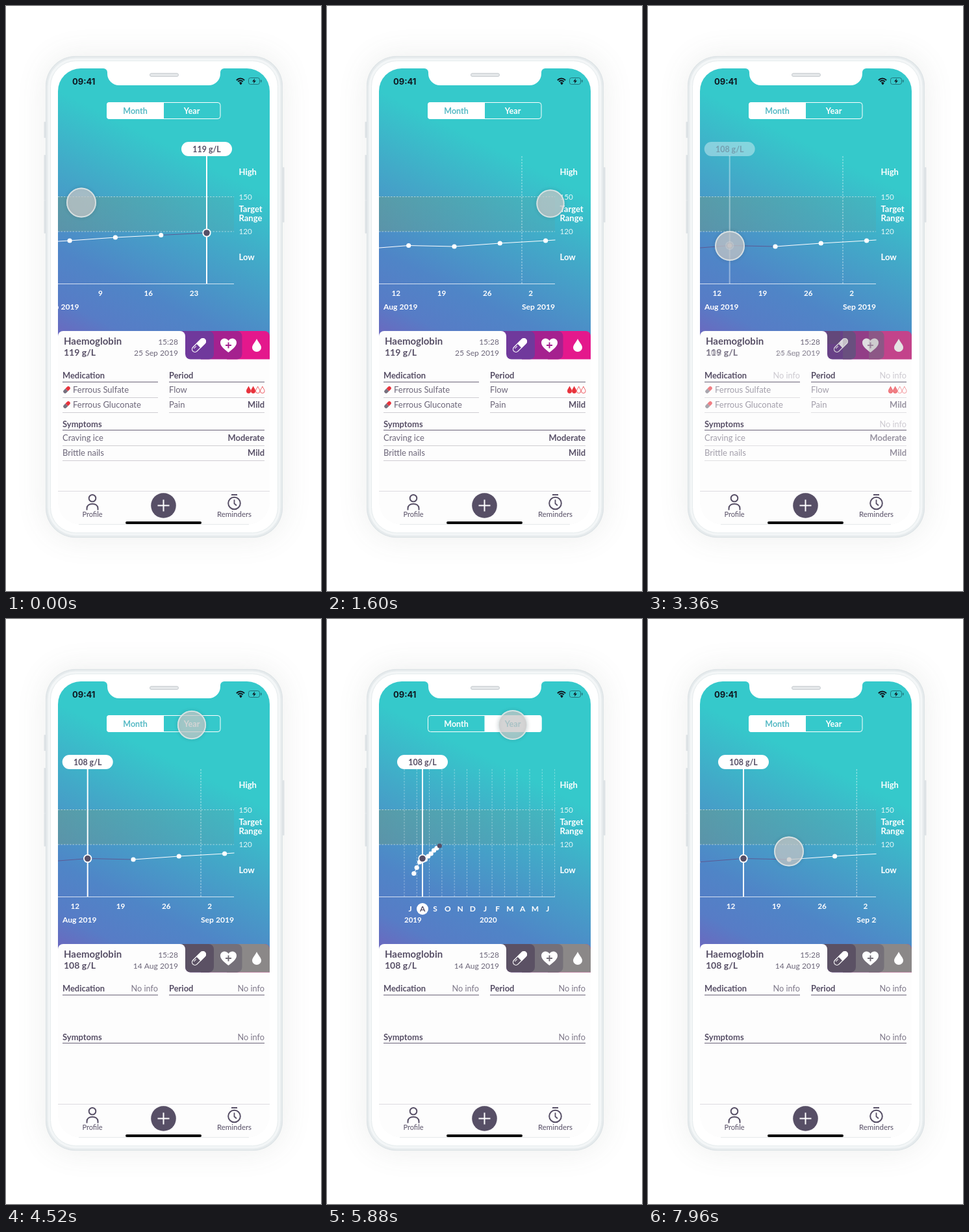
Recreate the animation shown at these times as an HTML page with a canvas. Size 485 by 900 pixels, loop 8000 ms.

```html
<!DOCTYPE html>
<html lang="en">
<head>
<meta charset="utf-8">
<title>Blood tracker</title>
<style>
html, body { margin: 0; width: 100%; height: 100%; overflow: hidden; background: #fff; }
canvas { display: block; width: 485px; height: 900px; }
</style>
</head>
<body>
<canvas id="stage"></canvas>
<script>
const W = 485, H = 900, LOOP = 8000;
const canvas = document.getElementById('stage');
const dpr = window.devicePixelRatio || 1;
canvas.width = W * dpr;
canvas.height = H * dpr;
const c = canvas.getContext('2d');

const INK = '#574f66', SOFT = '#6c6679', TEAL = '#55b9c4', RED = '#e8323c';
const DOT_Y = [391.5, 382.5, 374, 368.5, 370, 365, 361, 356, 352.5, 349];
const MONTH_GAP = 70.3, YEAR_GAP = 4.39, FIRST_ANCHOR = -112.8, YEAR_ANCHOR = 147;
const SCROLL = { at: 523, dur: 1000, dist: 238.5 };
const PICK = 3300, TO_YEAR = 4800, TO_MONTH = 6600, MORPH = 750;

// Touch point: time, x, y, radius
const TOUCH = [
  [0, 116, 302.5, 23], [380, 93, 302.5, 23], [523, 93, 302.5, 21], [1523, 344, 304, 21],
  [1700, 344, 304, 23], [2400, 344, 304, 23], [3050, 126, 369, 23], [3200, 126, 369, 21],
  [3350, 126, 369, 23], [3600, 126, 369, 23], [4250, 286, 163, 23], [4450, 286, 163, 23],
  [4600, 286, 163, 21], [4800, 286, 163, 23], [6000, 286, 163, 23], [6350, 203, 163, 23],
  [6500, 203, 163, 21], [6650, 203, 163, 23], [7250, 203, 163, 23], [7900, 217, 357.5, 23],
  [LOOP, 217, 357.5, 23]
];

const clamp = v => Math.max(0, Math.min(1, v));
const mix = (a, b, p) => a + (b - a) * p;
const ramp = (t, at, dur) => clamp((t - at) / dur);
const cubic = p => p < .5 ? 4 * p ** 3 : 1 - 4 * (1 - p) ** 3;
const ease = (t, at, dur) => cubic(ramp(t, at, dur));

function touchAt(t) {
  const i = Math.max(1, TOUCH.findIndex(k => k[0] > t));
  const a = TOUCH[i - 1], b = TOUCH[i];
  const p = ease(t, a[0], b[0] - a[0]);
  return [1, 2, 3].map(n => mix(a[n], b[n], p));
}

function text(s, x, y, size, bold, color = INK, align = 'left', family = 'Lato, "Open Sans", sans-serif') {
  c.font = `${bold ? 700 : 400} ${size}px ${family}`;
  c.fillStyle = color;
  c.textAlign = align;
  c.fillText(s, x, y);
}

function box(x, y, w, h, r, fill, stroke, lw = 1) {
  c.beginPath();
  c.roundRect(x, y, w, h, r);
  if (fill) { c.fillStyle = fill; c.fill(); }
  if (stroke) { c.strokeStyle = stroke; c.lineWidth = lw; c.stroke(); }
}

function disc(x, y, r, fill, stroke, lw = 1) {
  c.beginPath();
  c.arc(x, y, r, 0, Math.PI * 2);
  if (fill) { c.fillStyle = fill; c.fill(); }
  if (stroke) { c.strokeStyle = stroke; c.lineWidth = lw; c.stroke(); }
}

function line(points, color, lw = 1, dash = []) {
  c.beginPath();
  points.forEach(([x, y], i) => i ? c.lineTo(x, y) : c.moveTo(x, y));
  c.setLineDash(dash);
  c.strokeStyle = color;
  c.lineWidth = lw;
  c.stroke();
  c.setLineDash([]);
}

function scoped(fn, alpha = 1) {
  if (alpha <= 0) return;
  c.save();
  c.globalAlpha *= alpha;
  fn();
  c.restore();
}

function shape(d, x, y, fill, stroke, lw = 1) {
  scoped(() => {
    c.translate(x, y);
    const p = new Path2D(d);
    if (fill) { c.fillStyle = fill; c.fill(p); }
    if (stroke) { c.strokeStyle = stroke; c.lineWidth = lw; c.stroke(p); }
  });
}

function drawBody() {
  scoped(() => {
    c.shadowColor = 'rgba(90,100,90,.11)';
    c.shadowBlur = 48 * dpr;
    box(61, 77, 365, 741, 46, '#e2e7e9');
  });
  [[58.5, 178, 25], [58.5, 229, 70], [58.5, 299, 51], [426, 248, 85]]
    .forEach(([x, y, h]) => box(x, y, 2.5, h, 1, '#dde2e5'));
  box(61.5, 77.5, 364, 740, 46, '#e6ebed', '#dde3e6');
  box(64.5, 80.5, 358, 734, 43, '#f3f6f7');
  box(68.5, 84.5, 350, 726, 39, '#fff', '#e6eced');
}

function drawBackdrop() {
  c.fillStyle = '#fdfdfd';
  c.fillRect(80, 96, 326, 702);
  const g = c.createLinearGradient(-.447 * 80, .894 * 80, -.447 * 415, .894 * 415);
  [[0, '#35c9cb'], [.3, '#42a9c8'], [.66, '#4f85c7'], [.86, '#577cc6'], [1, '#6a69bf']]
    .forEach(s => g.addColorStop(...s));
  c.fillStyle = g;
  c.fillRect(80, 96, 326, 418);
  const band = c.createLinearGradient(80, 300, 340, 345);
  band.addColorStop(0, 'rgba(110,155,130,.45)');
  band.addColorStop(1, 'rgba(85,165,170,.3)');
  c.fillStyle = band;
  c.fillRect(80, 293, 271, 54);
}

function drawNotch() {
  c.beginPath();
  c.moveTo(149, 94);
  c.lineTo(149, 96);
  c.arcTo(156, 96, 156, 103, 6);
  c.arcTo(156, 122, 175, 122, 18);
  c.arcTo(330, 122, 330, 103, 18);
  c.arcTo(330, 96, 337, 96, 6);
  c.lineTo(337, 94);
  c.fillStyle = '#fff';
  c.fill();
}

function drawStatus() {
  drawNotch();
  text('09:41', 102, 120.5, 13, true, '#101820', 'left', 'Inter, sans-serif');
  [2, 5.2, 8.4].forEach((r, i) => {
    c.beginPath();
    c.arc(361, 120, r, -Math.PI * .76, -Math.PI * .24);
    if (!i) { c.lineTo(361, 120.8); c.fillStyle = '#101820'; c.fill(); }
    c.strokeStyle = '#101820';
    c.lineWidth = 2;
    c.stroke();
  });
  box(373.5, 110.5, 17, 10, 3, null, 'rgba(20,50,60,.55)');
  box(392, 113.5, 1.5, 4, .7, 'rgba(20,50,60,.55)');
  shape('M1 -4L-3 .7H-.3L-1 4L3 -.7H.3Z', 382, 115.5, '#101820');
}

function drawToggle(year) {
  box(155.5, 148.5, 174.5, 25, 4, null, '#fff');
  box(year ? 242.5 : 155, 148, 88, 26, year ? [0, 4, 4, 0] : [4, 0, 0, 4], '#fff');
  text('Month', 199, 165.5, 12.5, true, year ? '#fff' : TEAL, 'center');
  text('Year', 286, 165.5, 12.7, true, year ? TEAL : '#fff', 'center');
}

function drawScale() {
  const dim = 'rgba(255,255,255,.5)';
  line([[80, 293.5], [351, 293.5]], dim, 1, [2.5, 2]);
  line([[80, 347], [351, 347]], dim, 1, [2.5, 2]);
  line([[80, 427.5], [351, 427.5]], 'rgba(255,255,255,.75)');
  [['High', 259.5], ['Target', 317.3], ['Range', 331.3], ['Low', 390.7]]
    .forEach(([s, y]) => text(s, 358.5, y, 13, true, '#fff'));
  text('150', 358.5, 297.5, 11.7, false, '#e4f6f7');
  text('120', 358.5, 351, 11.7, false, '#e4f6f7');
}

function drawMonthAxis(off, first) {
  [23, 16, 9, 2, 26, 19, 12, 5].forEach((day, i) =>
    text(day, 282.7 - 70.3 * i + off, 445.5, 11.7, true, '#fff'));
  text('Sep 2019', 61.5 + off, 466.5, 12.1, true, '#fff');
  if (first) text('Aug 2019', -151.5 + off, 466.5, 12.1, true, '#fff');
}

function drawYearAxis() {
  disc(147, 446, 9, '#fff');
  [...'JASONDJFMAMJ'].forEach((s, i) =>
    text(s, 128 + 19.25 * i, 450.3, 12, true, i === 1 ? INK : '#fff', 'center'));
  text('2019', 119, 466.5, 11.5, true, '#fff');
  text('2020', 235, 466.5, 11.5, true, '#fff');
}

function drawMarker(x, y, label) {
  line([[x, 230], [x, 427]], '#fff', 2);
  box(x - 39, 209, 78, 22, 11, '#fff');
  text(label, x, 224.5, 12.4, true, INK, 'center');
  disc(x, y, 6.6, '#fff');
  disc(x, y, 4.8, INK);
}

function drawChart(t) {
  const off = SCROLL.dist * ease(t, SCROLL.at, SCROLL.dur);
  const shrink = ease(t, TO_YEAR, MORPH) - ease(t, TO_MONTH, MORPH);
  const gap = mix(MONTH_GAP, YEAR_GAP, shrink);
  const anchor = mix(FIRST_ANCHOR + off, YEAR_ANCHOR, ease(t, TO_YEAR, MORPH));
  const inYear = t >= TO_YEAR && t < TO_MONTH;
  const late = t >= TO_MONTH;
  const axisOff = late ? YEAR_ANCHOR - FIRST_ANCHOR : off;
  const picked = t >= PICK, shown = ramp(t, PICK, 160);
  const xs = DOT_Y.map((_, i) => anchor + (i - 3) * gap);
  const sel = picked ? 3 : 9;
  const gridLine = x => line([[x, 231], [x, 427]], 'rgba(255,255,255,.62)', 1, [2.5, 2]);

  drawScale();
  c.save();
  c.beginPath();
  c.rect(80, 180, 271.5, 315);
  c.clip();

  scoped(() => {
    const spread = 1 + .015 * ease(t, TO_MONTH, 200);
    for (let i = 0; i <= 12; i++) gridLine(YEAR_ANCHOR + (19.3 * i - 28) * spread);
  }, ramp(t, 5350, 850) * (1 - ramp(t, 6780, 420)));

  scoped(() => gridLine(61.5 + axisOff),
    late ? ramp(t, 7100, 250) : 1 - ramp(t, TO_YEAR, 200));

  if (inYear) drawYearAxis();
  else drawMonthAxis(axisOff, !late);

  for (let i = 0; i < 9; i++) {
    const dark = i === sel || i + 1 === sel;
    line([[xs[i], DOT_Y[i]], [xs[i + 1], DOT_Y[i + 1]]], dark ? '#5c5a94' : '#fff', 1);
  }
  xs.forEach((x, i) => disc(x, DOT_Y[i], 3.6, picked && i === 9 ? INK : '#fff'));
  if (picked) scoped(() => drawMarker(xs[3], DOT_Y[3], '108 g/L'), shown);
  else drawMarker(xs[9], DOT_Y[9], '119 g/L');
  c.restore();
}

const DROP = 'M0 -10C2 -5 7 -1 7 3.5A7 6.5 0 0 1 -7 3.5C-7 -1 -2 -5 0 -10Z';
const HEART = 'M0 11C-5 7 -12.5 2 -12.5 -4C-12.5 -8 -9.5 -10.5 -6 -10.5C-3.5 -10.5 -1.2 -9 0 -7C1.2 -9 3.5 -10.5 6 -10.5C9.5 -10.5 12.5 -8 12.5 -4C12.5 2 5 7 0 11Z';

function drawTabs(colors) {
  box(340, 500, 66, 43.5, [0, 8, 0, 0], colors[2]);
  box(300, 500, 63.5, 43.5, [0, 8, 8, 0], colors[1]);
  box(266, 500, 30, 20, 0, colors[0]);
  box(276, 500, 44, 43.5, [0, 8, 8, 8], colors[0]);
  scoped(() => {
    c.translate(297, 522);
    c.rotate(-Math.PI / 4);
    box(-13, -4.4, 26, 8.8, 4.4, null, '#fff', 1.2);
    box(-1, -4.9, 14.5, 9.8, [0, 4.9, 4.9, 0], '#fff');
    line([[-9, -2], [-4, -2]], '#fff');
  });
  shape(HEART, 342.5, 522, '#fff');
  line([[338, 522], [347, 522]], colors[1], 2);
  line([[342.5, 517.5], [342.5, 526.5]], colors[1], 2);
  shape(DROP, 386, 522, '#fff');
}

function row(left, right, x, x2, y, strong) {
  text(left, x, y, 13, false, SOFT);
  if (right) text(right, x2, y, strong ? 12.9 : 12.7, strong, strong ? INK : '#7d7788', 'right');
}

function smallPill(y) {
  scoped(() => {
    c.translate(93.5, y);
    c.rotate(-Math.PI / 4);
    box(-6.3, -2.8, 6.3, 5.6, [2.8, 0, 0, 2.8], '#77717f');
    box(0, -2.8, 6.3, 5.6, [0, 2.8, 2.8, 0], RED);
  });
}

function drawFilled() {
  text('119 g/L', 89, 538.3, 14, true);
  text('25 Sep 2019', 265, 538, 12.1, false, SOFT, 'right');
  [595, 618].forEach((y, i) => {
    smallPill(y - 4.5);
    row(['Ferrous Sulfate', 'Ferrous Gluconate'][i], '', 103, 0, y);
    line([[87, y + 7.5], [234, y + 7.5]], '#cfcdd2');
    line([[251, y + 7.5], [398, y + 7.5]], '#cfcdd2');
  });
  row('Flow', '', 251, 398, 595);
  for (let i = 0; i < 4; i++) scoped(() => {
    c.translate(373.5 + 7.1 * i, 590.5);
    c.scale(.46, .52);
    shape(DROP, 0, 0, i < 2 ? RED : '#fff', RED, 1.6);
  });
  row('Pain', 'Mild', 251, 398, 618, true);
  row('Craving ice', 'Moderate', 87, 398, 669, true);
  row('Brittle nails', 'Mild', 87, 398, 692, true);
  [676.5, 699.5].forEach(y => line([[87, y], [398, y]], '#cfcdd2'));
}

function drawEmpty() {
  text('108 g/L', 89, 538.3, 14, true);
  text('14 Aug 2019', 265, 538, 12.1, false, SOFT, 'right');
  row('', 'No info', 0, 234, 573);
  row('', 'No info', 0, 398, 573);
  row('', 'No info', 0, 398, 647.5);
}

function drawDetails(t) {
  const p = ramp(t, PICK, 160);
  box(80, 530, 326, 267, 0, '#fdfdfd');
  drawTabs(['#70399c', '#a5218f', '#e4188c']);
  scoped(() => drawTabs(['#5b5164', '#757079', '#8b8888']), p);
  box(80, 500, 196, 60, [8, 8, 0, 0], '#fdfdfd');
  text('Haemoglobin', 89, 521, 15, true);
  text('15:28', 265, 521, 12, false, SOFT, 'right');
  text('Medication', 87, 573, 12.9, true);
  text('Period', 251, 573, 12.9, true);
  text('Symptoms', 87, 647.5, 13, true);
  [[87, 234, 578.5], [251, 398, 578.5], [87, 398, 652.5]]
    .forEach(([a, b, y]) => line([[a, y], [b, y]], '#6a6378'));
  scoped(drawFilled, 1 - p);
  scoped(drawEmpty, p);
}

function drawNav() {
  line([[80, 746.5], [406, 746.5]], '#dddce0');
  disc(133, 757.3, 5.3, null, INK, 2);
  shape('M-8.5 5V2.5C-8.5 -2 -5 -4.5 0 -4.5S8.5 -2 8.5 2.5V5', 133, 770.5, null, INK, 2);
  text('Profile', 133, 786, 11, false, INK, 'center');
  disc(242.5, 768.5, 19.3, INK);
  line([[233.5, 768.5], [251.5, 768.5]], '#fff', 2);
  line([[242.5, 759.5], [242.5, 777.5]], '#fff', 2);
  disc(351.5, 765, 9.3, null, INK, 2);
  line([[347, 752], [356, 752]], INK, 2);
  line([[351.5, 759.5], [351.5, 765.5], [355, 768.5]], INK, 1.8);
  text('Reminders', 351.5, 786, 11.5, false, INK, 'center');
  box(184, 793, 117, 4, 2, '#000');
}

function drawTouch(t) {
  const [x, y, r] = touchAt(t);
  scoped(() => {
    c.shadowColor = 'rgba(40,60,70,.45)';
    c.shadowBlur = 5 * dpr;
    disc(x, y, r - 1, null, 'rgba(225,232,232,.7)', 2);
  });
  disc(x, y, r - 1, 'rgba(198,198,198,.74)', 'rgba(232,238,238,.6)', 1.8);
}

function draw(t) {
  c.setTransform(dpr, 0, 0, dpr, 0, 0);
  c.fillStyle = '#fff';
  c.fillRect(0, 0, W, H);
  drawBody();
  c.save();
  c.beginPath();
  c.roundRect(80, 96, 326, 702, 35);
  c.clip();
  drawBackdrop();
  drawStatus();
  drawToggle(t >= TO_YEAR && t < TO_MONTH);
  drawChart(t);
  drawDetails(t);
  drawNav();
  drawTouch(t);
  c.restore();
  line([[112, 797.5], [374, 797.5]], '#e6e9ea');
  box(221.5, 103.5, 44, 5, 2.5, '#e4e7e9', '#c9ced1');
}

const start = performance.now();
function tick() {
  draw((performance.now() - start) % LOOP);
  requestAnimationFrame(tick);
}
tick();
</script>
</body>
</html>
```
